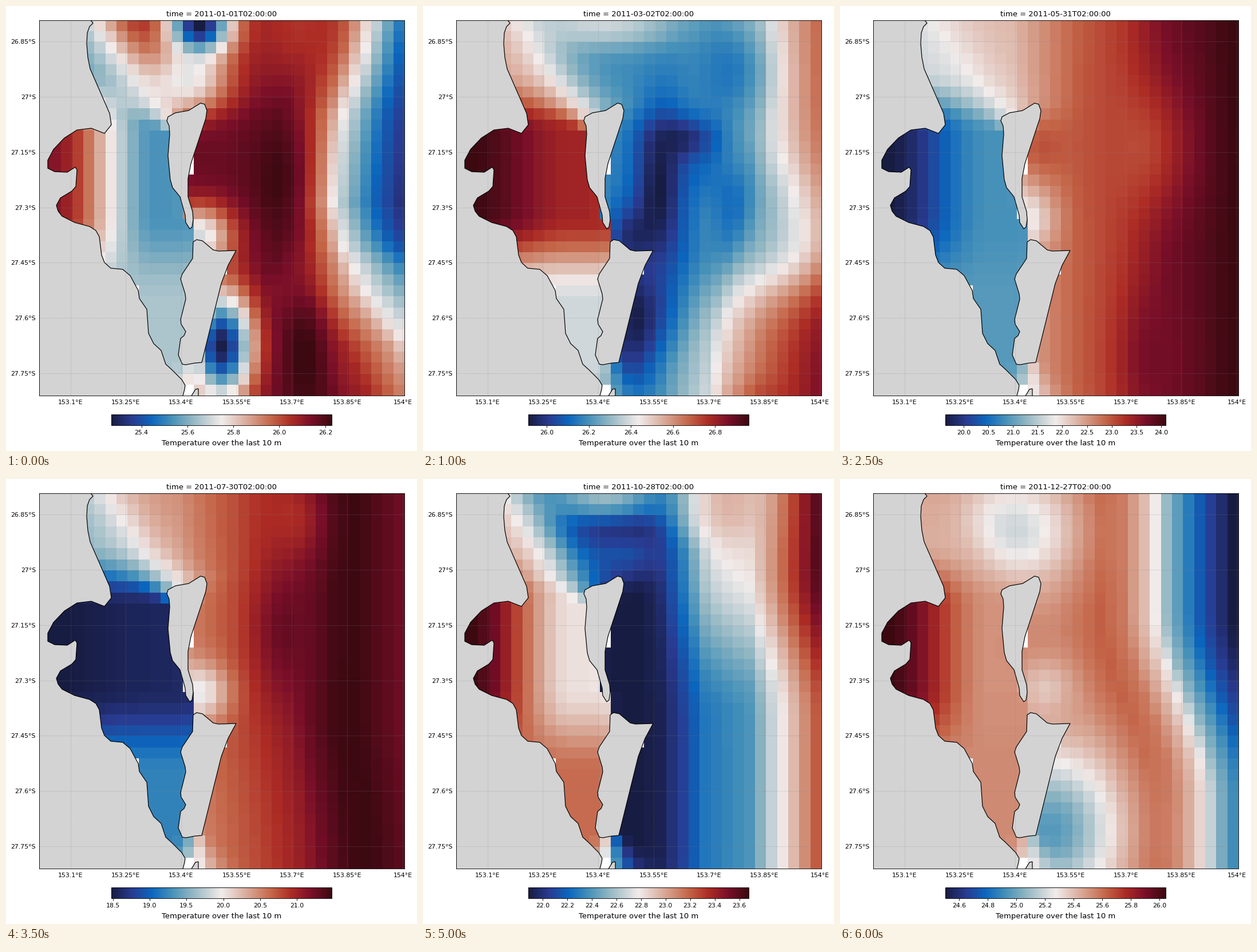
A matplotlib script for the animation above (6500 ms loop, 718 px wide and 779 px high).

```python
import numpy as np
import matplotlib.pyplot as plt
from matplotlib.animation import FuncAnimation
from matplotlib.colors import LinearSegmentedColormap
from matplotlib.patches import Polygon

W, H, DPI = 718, 779, 64
LEFT, TOP, CELL = 57.5, 24.5, 19.35
COLS, ROWS = 33, 34
RIGHT, BOTTOM = LEFT + COLS * CELL, TOP + ROWS * CELL
STEPS, INTERVAL = 13, 500
MISSING = [(12, 13), (13, 13), (22, 16), (24, 8), (33, 13)]

plt.rcParams["font.family"] = "DejaVu Sans"


def pt(px):
    return px * 72 / DPI


# Diverging blue-white-red map: even stops plus a near-white centre.
tones = ["#171c42", "#293a8f", "#0b66bd", "#4590b9", "#8eb5c2", "#d2d8db",
         "#e6d2cc", "#d59d89", "#c46548", "#ac2b24", "#780e28", "#3c0911"]
stops = [(i / 11, c) for i, c in enumerate(tones)]
stops.insert(6, (0.5, "#f1eceb"))
balance = LinearSegmentedColormap.from_list("balance", stops)

# Temperature model, in percent of each month's range.
row, col = np.mgrid[0:ROWS, 0:COLS].astype(float)


def smooth(x, start, end):
    t = np.clip((x - start) / (end - start), 0, 1)
    return t * t * (3 - 2 * t)


def bay_share():
    """1 in the sheltered bay, 0 at sea; the edge softens past the islands."""
    north = np.clip(10 - row, 0, 10)
    south = np.clip(row - 30, 0, 3)
    edge = np.where(row < 18, 12.5, 13.5) - 0.65 * north
    width = 0.12 + 0.5 * np.minimum(north, 3) + 0.3 * south
    return 1 / (1 + np.exp((col - edge) / width))


def bay_field(head, middle, channel, coast):
    field = head + (middle - head) * smooth(col, 0.5, 10)
    field += (channel - field) * smooth(row, 17, 25)
    return field + (coast - field) * smooth(row, 10, 4)


def spot(field, value, x, y, rx, ry):
    """Pull the field towards a value around one place."""
    near = np.exp(-((col - x) / rx) ** 2 - ((row - y) / ry) ** 2)
    return field + (value - field) * near


fields = {}


def add_field(step, low, high, bay, sea, *spots):
    for s in spots:
        sea = spot(sea, *s)
    share = bay_share()
    full = share * bay_field(*bay) + (1 - share) * sea
    full = (full - full.min()) / np.ptp(full)
    fields[step] = low + (high - low) * full


# January: a warm current with its eastern edge swinging away southwards.
edge = np.interp(row, [0, 8, 16, 20, 24, 29, 33], [28.5, 26.7, 26, 27, 29, 33, 35])
across = (col - edge) / (1 + smooth(row, 18, 26))
add_field(0, 25.269, 26.228, (88, 29, 41, 32),
          np.interp(across, [-5, -3, -1, 0, 2, 4, 7], [92, 82, 64, 50, 33, 18, 5]),
          (80, 23, 0, 5, 6), (52, 13, 5, 4, 3), (2, 14, 0, 3, 2.8),
          (98, 21, 14, 2.5, 6), (99, 23.5, 30, 2, 6),
          (47, 14, 19, 3, 2.8), (3, 16, 29, 2.8, 5))

# End of January: a cold eddy in mild water.
add_field(1, 26.036, 28.093, (98, 67, 72, 56), np.full((ROWS, COLS), 29.0),
          (7, 26, 17, 8, 6.5), (3, 29.5, 19.5, 4.5, 4), (3, 18, 15, 2.2, 7),
          (4, 20, 10.5, 3, 2), (20, 21.5, 17, 1.8, 5),
          (9, 15.5, 27, 2.5, 7), (36, 26, 34, 3, 2))

# April: a warm front in the east, slanting southwest.
across = col - 27 + 5 * smooth(row, 4, 33)
add_field(3, 25.245, 27.094, (34, 51, 4, 41),
          np.interp(across, [-8, -4, 0, 2, 5, 10], [31, 36, 50, 65, 80, 99]),
          (51, 13, 0, 7, 2), (27, 24, 4, 3.5, 4.5),
          (19, 15, 19, 2, 2.5), (25, 17, 26, 3, 4))

# May: steady warming offshore.
add_field(5, 19.629, 24.093, (4, 30, 32, 46),
          np.interp(col, [12, 18, 22, 26, 29, 32], [60, 74, 80, 91, 95, 99]),
          (77, 23, 11, 4.5, 6), (76, 15, 11, 3, 3),
          (50, 13, 17.5, 2.5, 2.5), (91, 25, 30, 3, 6))

# July: the warm core lies offshore.
across = col - 1.5 * smooth(row, 18, 33)
add_field(7, 18.477, 21.475, (4, 7, 27, 38),
          np.interp(across, [12, 14, 18, 22, 24, 26, 28, 32],
                    [66, 70, 77, 85, 92, 97, 98, 91]),
          (80, 22, 2, 3, 4), (92, 22, 12, 3, 6), (50, 14, 17.5, 2.5, 2.5))

# October: cold water along the islands, warm in the northeast.
lift = 20 * smooth(row, 20, 6) * smooth(col, 16, 24)
add_field(10, 21.884, 23.676, (96, 52, 70, 61),
          np.interp(col, [16, 18, 20, 22, 26, 29, 32],
                    [4, 6, 14, 24, 30, 51, 72]) + lift,
          (60, 24, 0, 4, 5), (38, 13, 0, 6, 2), (15, 15, 5, 4, 2))

# December: a warm band with a cold eastern edge.
across = col - 25 - 4.5 * smooth(row, 10, 27)
add_field(12, 24.505, 26.043, (98, 65, 66, 60),
          np.interp(across, [-9, -5, -3, -1, 0, 1, 4, 7],
                    [67, 73, 69, 58, 50, 38, 17, 2]),
          (44, 12, 3, 5.5, 5), (57, 15, 17, 2.5, 2.5), (30, 15.5, 30, 6, 7))


def temperature(step):
    before = max(s for s in fields if s <= step)
    after = min(s for s in fields if s >= step)
    mix = (step - before) / max(after - before, 1)
    return (1 - mix) * fields[before] + mix * fields[after]


# Coastline corners in pixels.
mainland = [
    (50, 18), (146, 18), (148, 25), (152, 30), (146, 36), (142, 47), (141, 66),
    (143, 90), (147, 110), (181, 188), (184, 208), (172, 223), (149, 214),
    (124, 217), (102, 231), (83, 251), (73, 270), (73, 284), (85, 290),
    (107, 291), (121, 282), (124, 287), (122, 316), (115, 324), (95, 336),
    (88, 349), (91, 359), (98, 368), (120, 379), (146, 386), (157, 393),
    (163, 404), (167, 436), (172, 449), (183, 459), (204, 461), (217, 472),
    (231, 498), (233, 512), (246, 531), (249, 573), (258, 591), (271, 603),
    (279, 627), (290, 637), (307, 654), (313, 664), (312, 671), (307, 690),
    (50, 690)]
north_island = [
    (281, 201), (283, 194), (296, 187), (319, 183), (340, 170), (347, 172),
    (351, 183), (349, 197), (323, 276), (318, 302), (318, 334), (326, 360),
    (327, 374), (325, 387), (321, 390), (314, 379), (313, 366), (304, 334),
    (291, 318), (287, 304), (283, 262), (286, 224), (285, 210)]
south_island = [
    (327, 413), (333, 409), (343, 411), (362, 427), (371, 429), (402, 428),
    (388, 454), (376, 486), (342, 624), (330, 625), (314, 628), (308, 627),
    (301, 611), (305, 582), (311, 577), (314, 570), (306, 557), (305, 549),
    (314, 513), (313, 504), (305, 478), (308, 469), (326, 442)]
tip = [(323, 684), (331, 671), (336, 670), (336, 684)]

fig = plt.figure(figsize=(W / DPI, H / DPI), dpi=DPI, facecolor="white")


def pixel_axes(x0, y0, x1, y1):
    return fig.add_axes([x0 / W, 1 - y1 / H, (x1 - x0) / W, (y1 - y0) / H])


def caption(y, text=""):
    return fig.text(376.7 / W, 1 - y / H, text, ha="center", va="baseline",
                    fontsize=pt(13.17))


ax = pixel_axes(LEFT, TOP, RIGHT, BOTTOM)
mesh = ax.pcolormesh(LEFT + CELL * np.arange(COLS + 1),
                     TOP + CELL * np.arange(ROWS + 1),
                     temperature(0), cmap=balance)
for shape in (mainland, north_island, south_island, tip):
    ax.add_patch(Polygon(shape, facecolor="#d3d3d3", edgecolor="black",
                         linewidth=pt(1.2), zorder=2))

# Graticule every 0.15 degrees.
lons = 153.1 + 0.15 * np.arange(7)
lats = 26.85 + 0.15 * np.arange(7)
ax.set_xticks(112.5 + 645 * (lons - 153.1), [f"{v:.5g}°E" for v in lons])
ax.set_yticks(62.4 + 645 * (lats - 26.85), [f"{v:.4g}°S" for v in lats])
ax.tick_params(length=0, pad=pt(5.5), labelsize=pt(10.97))
ax.tick_params(axis="x", pad=pt(7))
ax.set_axisbelow(False)
ax.grid(color="gray", alpha=0.5, linestyle="--", linewidth=pt(0.55))
ax.set_xlim(LEFT, RIGHT)
ax.set_ylim(BOTTOM, TOP)
for spine in ax.spines.values():
    spine.set_linewidth(pt(0.9))

bar_ax = pixel_axes(184, 714.5, 569, 734)
bar = fig.colorbar(mesh, cax=bar_ax, orientation="horizontal")
bar.outline.set_linewidth(pt(0.9))
bar_ax.tick_params(length=pt(3.8), width=pt(0.9), pad=pt(3.8),
                   labelsize=pt(10.97))

title = caption(18.3)
caption(768.8, "Temperature over the last 10 m")
start = np.datetime64("2011-01-01T02:00:00")


def draw(step):
    data = temperature(step)
    low, high = data.min(), data.max()
    for cell in MISSING:
        data[cell] = np.nan
    mesh.set_array(np.ma.masked_invalid(data))
    mesh.set_clim(low, high)
    title.set_text(f"time = {start + np.timedelta64(30 * step, 'D')}")
    return mesh, title


anim = FuncAnimation(fig, draw, frames=STEPS, interval=INTERVAL, repeat=True)
plt.show()
```
